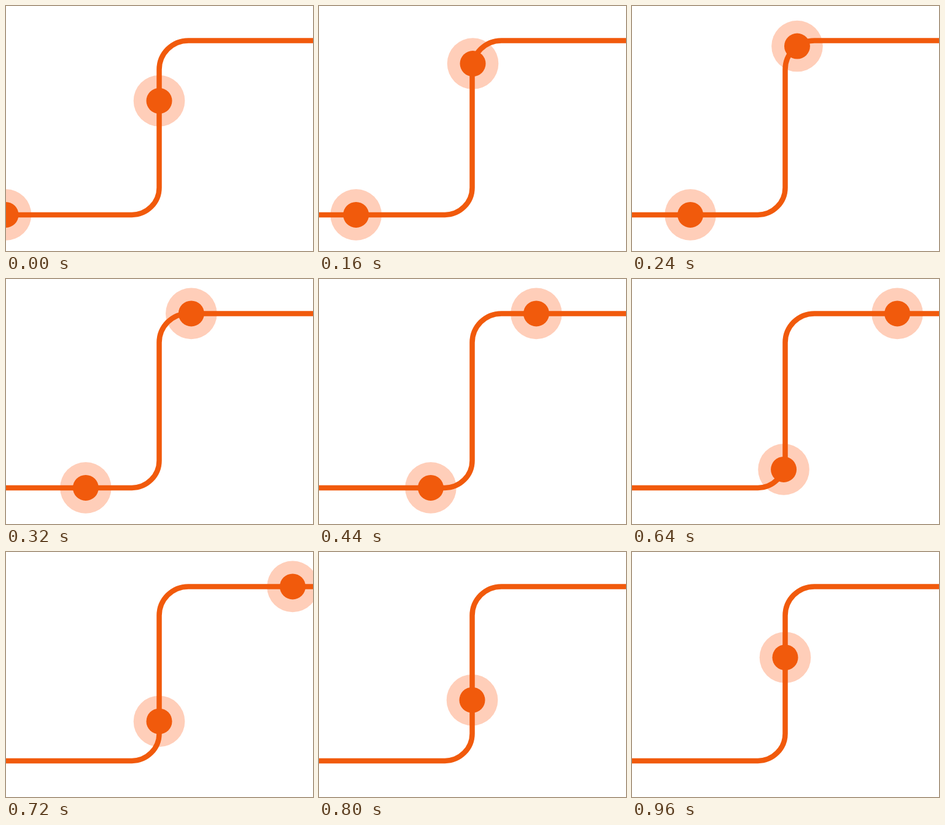
Write an HTML page that moves like this. It is 500 px wide and 400 px high and loops after 1000 ms.

```html
<!DOCTYPE html>
<html lang="en">
<head>
<meta charset="utf-8">
<title>Dots on a line</title>
<style>
  html, body { margin: 0; width: 100%; height: 100%; overflow: hidden; background: #fff; }
  svg { display: block; width: 100%; height: 100%; }
  .halo { fill: #ffceb9; }
  .core { fill: #f15a0c; }
  #line { fill: none; stroke: #f15a0c; stroke-width: 8.5; }
</style>
</head>
<body>
<svg viewBox="0 0 500 400">
  <circle class="halo" r="41.8"/>
  <circle class="halo" r="41.8"/>
  <path id="line" d="M-.5 340.9H205A44.5 44.5 0 0 0 249.5 296.4V104A47.5 47.5 0 0 1 297 56.4H500"/>
  <circle class="core" r="21"/>
  <circle class="core" r="21"/>
</svg>
<script>
  const LOOP = 1000, FRAME = 40, STEPS = 48;
  const GAP = 417; // distance between the dots, covered once per loop
  const line = document.getElementById("line");
  const halos = document.querySelectorAll(".halo");
  const cores = document.querySelectorAll(".core");
  const length = line.getTotalLength();

  function place(i, dist) {
    const p = line.getPointAtLength(dist);
    for (const c of [halos[i], cores[i]]) {
      c.setAttribute("cx", p.x);
      c.setAttribute("cy", p.y);
      c.setAttribute("visibility", dist < length ? "visible" : "hidden");
    }
  }

  function draw(now) {
    // 48 path steps sampled at 25 frames per loop
    const frame = Math.floor((now % LOOP) / FRAME);
    const step = Math.floor(frame * STEPS * FRAME / LOOP);
    const dist = GAP * step / STEPS;
    place(0, dist);
    place(1, dist + GAP);
  }

  const start = performance.now();
  function tick() {
    draw(performance.now() - start);
    requestAnimationFrame(tick);
  }
  tick();
</script>
</body>
</html>
```
